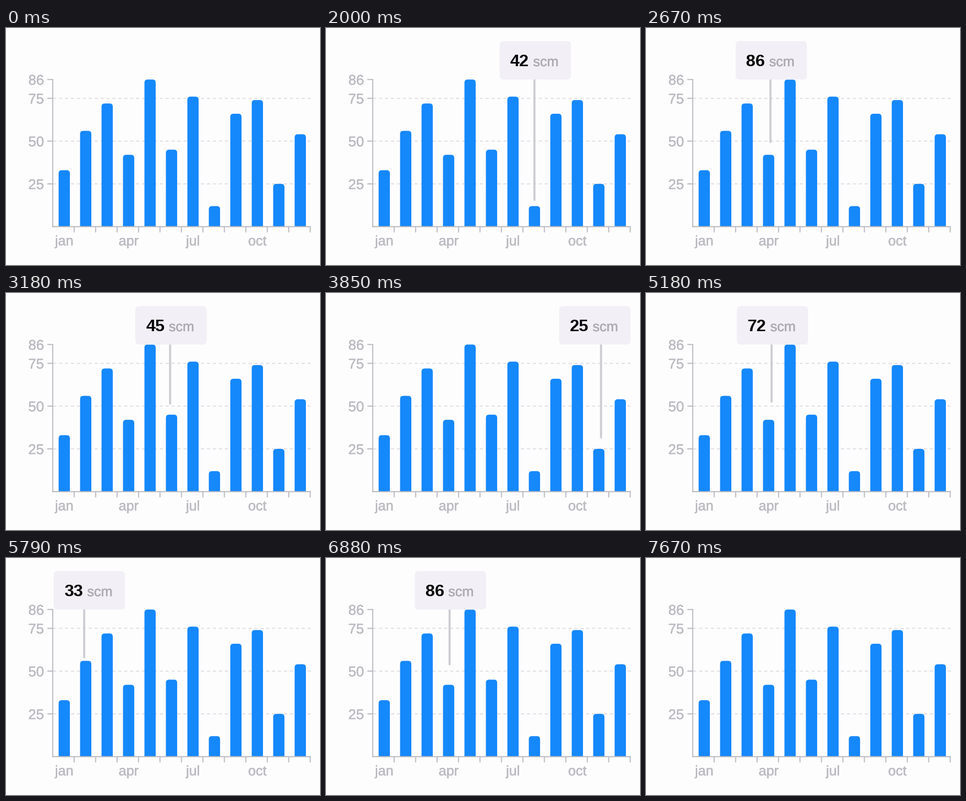
These frames come from a looping animation (600 by 453 pixels, 7700 ms). A matplotlib script:

```python
import numpy as np
import matplotlib.pyplot as plt
from matplotlib.animation import FuncAnimation
from matplotlib.patches import FancyBboxPatch, Rectangle
from matplotlib.patheffects import withStroke

W, H, DPI = 600, 453, 100
PT = 72 / DPI
LOOP, STEP = 7700, 28

BACK, BLUE, AXIS, GRID = "#fefdfe", "#1588fb", "#b9b8be", "#dfdde3"
LABEL, CARD, STEM, UNIT = "#bcbbc1", "#f2f0f6", "#cdccd0", "#adabb1"

VALUES = np.array([33, 56, 72, 42, 86, 45, 76, 12, 66, 74, 25, 54])
LEFT, RIGHT, BASE, GAP, BAR = 89.3, 581.5, 379.7, 41, 21.5
CENTERS = 111.3 + GAP * np.arange(12)


def level(value):
    return BASE - value * 3.27


# Finger drags: each sweeps evenly over neighbouring bars
# (start ms, end ms, first bar, last bar)
SHOW, HIDE = 2000, 7650
DRAGS = [
    (2000, 2000, 4, 4), (2580, 3190, 5, 7), (3220, 3275, 9, 12),
    (3570, 3570, 11, 11), (4110, 4320, 10, 7), (4515, 5340, 6, 2),
    (5693, 5693, 1, 1), (6380, 6588, 2, 4), (6766, 7150, 5, 8),
]
LAG, GLIDE = 40, 300


def sweep(start, end, first, last):
    count = abs(last - first) + 1
    return np.linspace([start, first], [end, last], count)


picks = np.vstack([sweep(*drag) for drag in DRAGS])
times = picks[:, 0]
picked = np.append(8, picks[:, 1]).astype(int) - 1
stops = np.column_stack([CENTERS, level(VALUES) - 10])[picked]
jumps = np.diff(stops, axis=0)

fig = plt.figure(figsize=(W / DPI, H / DPI), dpi=DPI, facecolor=BACK)
ax = fig.add_axes([0, 0, 1, 1])
ax.set_xlim(0, W)
ax.set_ylim(H, 0)
ax.axis("off")


def line(xs, ys, color, width=2, **kw):
    kw.setdefault("solid_capstyle", "butt")
    return ax.plot(xs, ys, color=color, lw=width * PT, snap=False, **kw)[0]


def rounded(x, y, w, h, r, color, z):
    style = f"round,pad=0,rounding_size={r}"
    return ax.add_patch(FancyBboxPatch((x, y), w, h, boxstyle=style,
                                       fc=color, ec="none", zorder=z))


def text(x, y, s, px, color, ha="left", weight="normal"):
    label = ax.text(x, y, s, fontsize=px * PT, color=color, ha=ha,
                    va="baseline", weight=weight,
                    family="Liberation Sans", zorder=6)
    if weight == "normal":
        label.set_path_effects([withStroke(linewidth=0.5 * PT,
                                           foreground=color)])
    return label


# Axes, grid and labels
for value in (25, 50, 75, 86):
    y = level(value)
    if value < 86:
        line([LEFT + 1, RIGHT + 1], [y, y], GRID, zorder=1,
             ls=(0, (3, 2.65)))
    line([79, LEFT], [y, y], AXIS, zorder=3)
    text(72.5, y + 10, str(value), 27, LABEL, ha="right")
line([LEFT, LEFT], [level(86) - 1, BASE + 1], AXIS, zorder=3)
line([LEFT - 1, RIGHT + 1], [BASE, BASE], AXIS, zorder=3)
for x in LEFT + GAP * np.arange(1, 13):
    line([x, x], [BASE, BASE + 11], AXIS, zorder=3)
for x, month in zip(CENTERS[::3], ("jan", "apr", "jul", "oct")):
    text(x, 415.5, month, 26.5, LABEL, ha="center")

# Bars with rounded tops, cut off at the base line
plot_area = Rectangle((0, 0), W, BASE, transform=ax.transData)
for x, top in zip(CENTERS, level(VALUES)):
    bar = rounded(x - BAR / 2, top, BAR, BASE + 10 - top, 6, BLUE, 2)
    bar.set_clip_path(plot_area)

# Tooltip
CARD_W, CARD_TOP, CARD_BOTTOM = 136.5, 25, 98.5
stem = line([0, 0], [0, 0], STEM, 4, zorder=4, solid_capstyle="round")
card = rounded(0, CARD_TOP, CARD_W, CARD_BOTTOM - CARD_TOP, 8, CARD, 5)
number = text(0, 73, "", 32.5, "#050507", weight="bold")
unit = text(0, 73, "scm", 26.5, UNIT)
tooltip = (stem, card, number, unit)


def position(t):
    u = np.clip((t - times - LAG) / GLIDE, 0, 1)
    return stops[0] + (u * u * (3 - 2 * u)) @ jumps


def draw(i):
    t = (i + 0.5) * STEP
    visible = SHOW <= t < HIDE
    for part in tooltip:
        part.set_visible(visible)
    if visible:
        x, y = position(t)
        left = np.clip(x + 1.7 - CARD_W / 2, 91, RIGHT + 0.5 - CARD_W)
        stem.set_data([x, x], [CARD_BOTTOM - 6, max(y - 2, CARD_BOTTOM - 6)])
        card.set_x(left)
        number.set_x(left + 20)
        unit.set_x(left + 64)
        current = picked[np.searchsorted(times, t, side="right")]
        number.set_text(str(VALUES[current]))
    return tooltip


anim = FuncAnimation(fig, draw, frames=LOOP // STEP, interval=STEP,
                     repeat=True, repeat_delay=0, blit=False)
plt.show()
```
